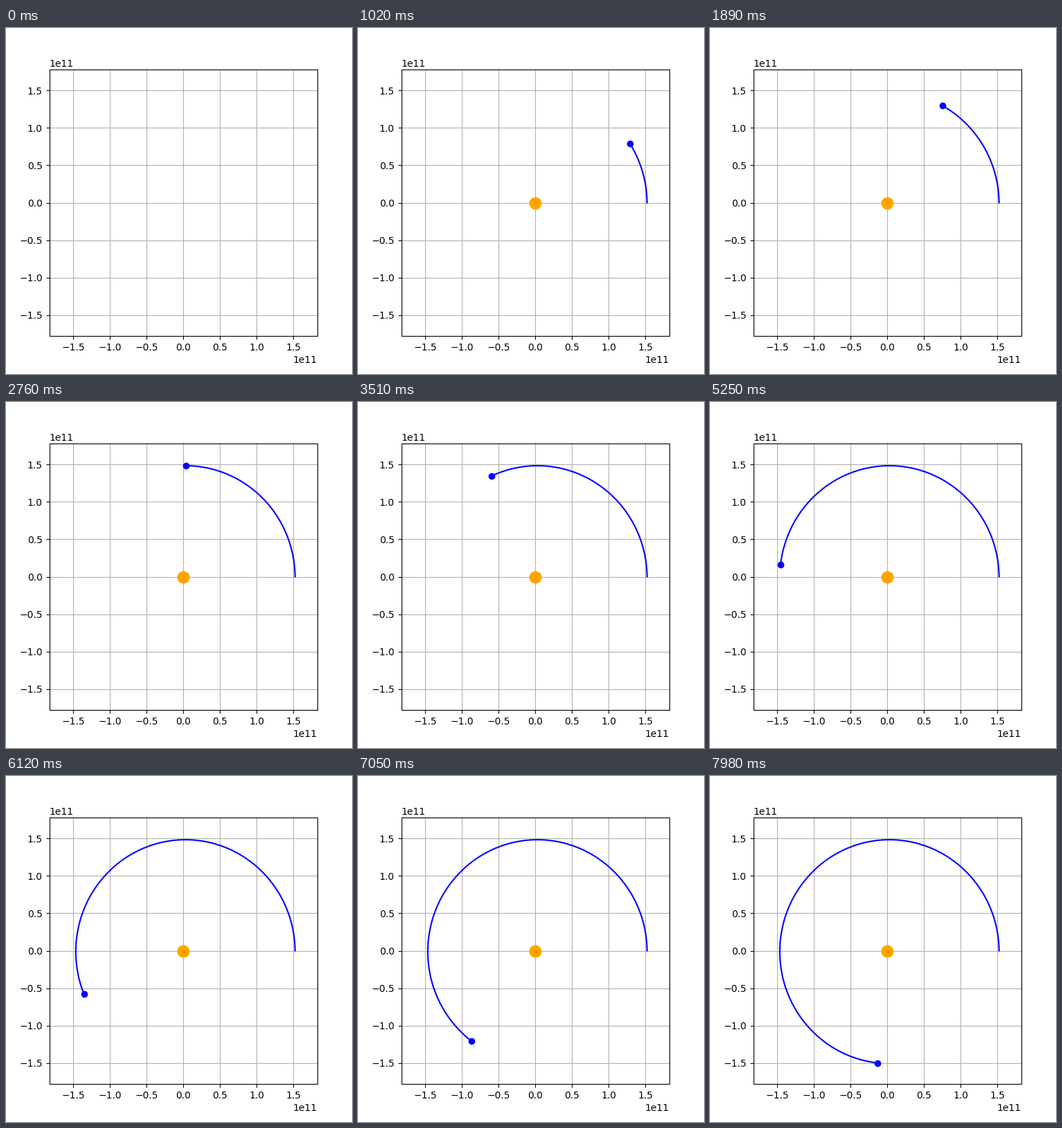
These frames come from a looping animation (500x500 px, 8 s). A matplotlib script:

```python
import math

import matplotlib.pyplot as plt
from matplotlib.animation import FuncAnimation

GM = 6.67e-11 * 2.0e30
AU = 1.5e11
DAY = 24 * 60 * 60
STEP_MS = 30    # one simulated day on screen
TICK_MS = 20
LOOP_MS = 8000


def orbit(days):
    """Semi-implicit Euler path of a planet released at aphelion."""
    x, y = 1.0167 * AU, 0.0
    vx, vy = 0.0, 29290.0
    xs, ys = [x], [y]
    for _ in range(days):
        pull = -GM / math.hypot(x, y) ** 3
        vx += pull * x * DAY
        vy += pull * y * DAY
        x += vx * DAY
        y += vy * DAY
        xs.append(x)
        ys.append(y)
    return xs, ys


xs, ys = orbit(300)

fig, ax = plt.subplots(figsize=(5, 5), dpi=100)
x_lim, y_lim = 1.2 * max(xs), 1.2 * max(ys)
ax.set_xlim(-x_lim, x_lim)
ax.set_ylim(-y_lim, y_lim)
ax.grid(True)

trail, = ax.plot([], [], color="blue", lw=1.5)
planet, = ax.plot([], [], "o", color="blue", markersize=6)
sun, = ax.plot([], [], "o", color="orange", markersize=12)
artists = (trail, planet, sun)


def init():
    for artist in artists:
        artist.set_data([], [])
    return artists


def update(tick):
    n = (tick * TICK_MS + TICK_MS // 2) // STEP_MS
    if n == 0:
        return init()
    trail.set_data(xs[:n], ys[:n])
    planet.set_data([xs[n - 1]], [ys[n - 1]])
    sun.set_data([0], [0])
    return artists


anim = FuncAnimation(fig, update, frames=LOOP_MS // TICK_MS, init_func=init,
                     interval=TICK_MS, repeat=True, repeat_delay=0, blit=False)
plt.show()
```
